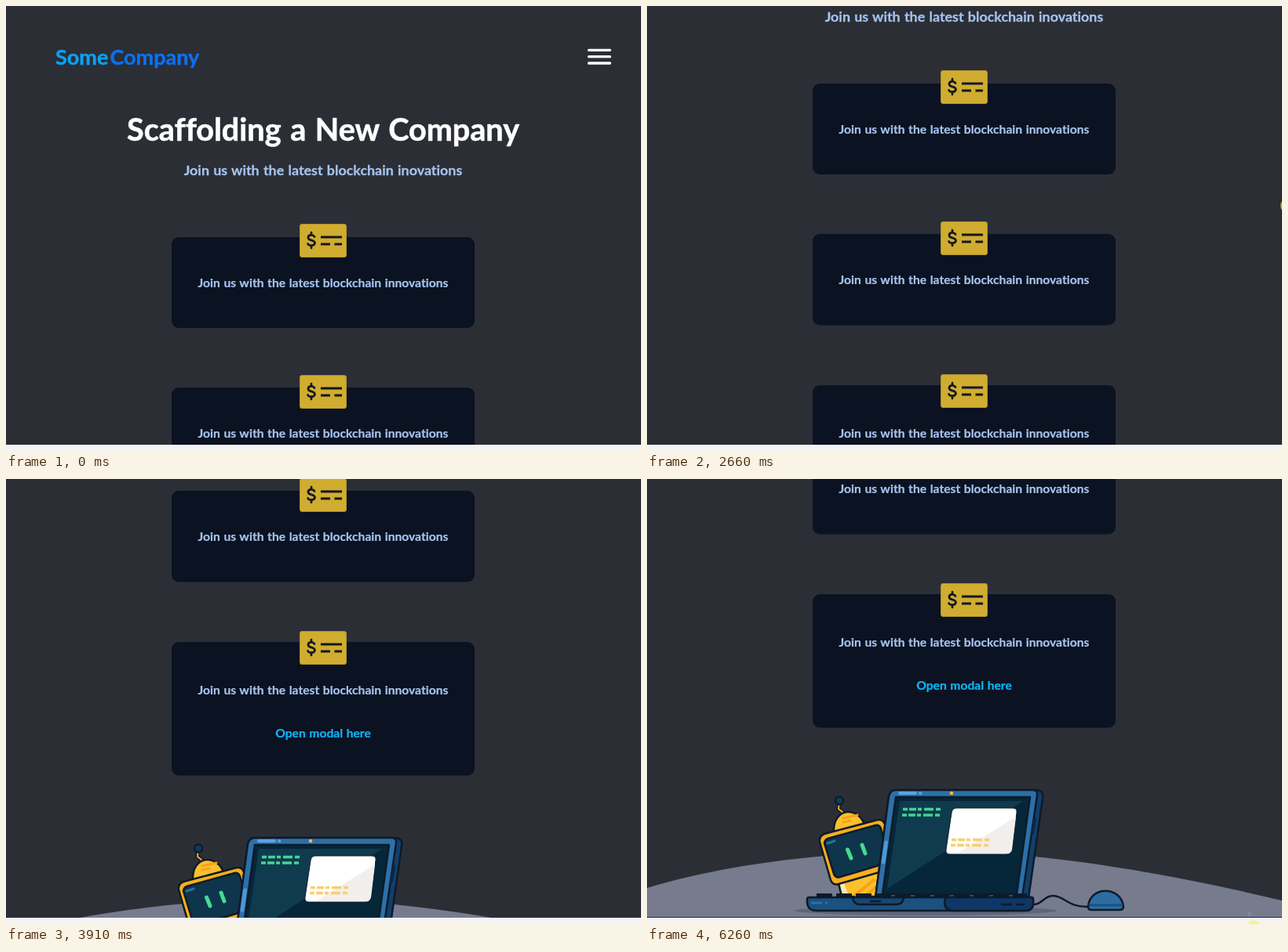
An HTML page for the animation above (6.32 s loop, 809 by 568 pixels).

```html
<!DOCTYPE html>
<html lang="en">
<head>
<meta charset="utf-8">
<title>Scrolling landing page</title>
<style>
  html, body { margin: 0; width: 100%; height: 100%; overflow: hidden; background: #2c2e36; }
  svg { display: block; width: 809px; height: 568px; }
  text {
    font: 700 15.65px Nunito, Lato, sans-serif; font-variant-ligatures: none; word-spacing: .05em;
    fill: currentColor; stroke: currentColor; stroke-width: .015em; stroke-linejoin: round;
  }
  .mid { text-anchor: middle; color: #a6c4ee; }
  .logo { font-size: 27px; }
  .ink { stroke: #0d1b28; stroke-width: 2.5; stroke-linejoin: round; }
  .line { fill: none; stroke-linecap: round; }
</style>
</head>
<body>
<svg viewBox="0 0 809 568">
  <defs>
    <g id="icon">
      <rect x="374.500" y=".5" width="59" height="42" rx="2.500" fill="#d0ad30" stroke="#b2942f"/>
      <path d="M393 16.500C391 13 384.500 14 385 18C385.500 22 393.500 20 393.500 24.500C393 28.500 386 28.500 384.500 25.500M389 11V14M389 28V31" class="line" stroke="#15171f" stroke-width="2.700"/>
      <path d="M401 17H428M401 26H413M418.500 26H428" fill="none" stroke="#15171f" stroke-width="3"/>
    </g>
  </defs>

  <rect width="809" height="568" fill="#2c2e36"/>
  <g id="page">
    <text class="logo" x="63" y="75" color="#09a3f2">Some</text>
    <text class="logo" x="132.500" y="75" color="#0b72f0">Company</text>
    <path d="M742.500 56.300H769.500M742.500 64.700H769.500M742.500 73H769.500" class="line" stroke="#fff" stroke-width="3.300"/>
    <text class="mid" x="404" y="172" style="font-size:39.6px;color:#fff">Scaffolding a New Company</text>
    <text class="mid" x="404" y="216" style="font-size:17.9px">Join us with the latest blockchain inovations</text>
    <g id="cards"></g>
    <text class="mid" x="404" y="802" style="color:#0db4f8">Open modal here</text>

    <g transform="translate(0 533)">
      <path d="M0 522C130 482 310 470 430 477C560 484 700 512 809 538V559H0Z" fill="#777b8e"/>
      <ellipse cx="355" cy="551" rx="167" ry="6" fill="#5f657d"/>

      <!-- robot -->
      <path d="M254 429L244 421L245 412" class="line" stroke="#0d1b28" stroke-width="5"/>
      <path d="M254 429L244 421L245 412" class="line" stroke="#f8b11f" stroke-width="2"/>
      <circle cx="245" cy="410.500" r="5" fill="#123c58" class="ink"/>
      <path d="M238 452C236 418 271 417 278 444Z" fill="#fcc02d" class="ink"/>
      <path d="M250 433L268 429M250 438L259 436" class="line" stroke="#f5a21a" stroke-width="3"/>
      <path d="M243 512L248 533H300V500Z" fill="#fcc02d" class="ink"/>
      <path d="M246 517L250 532H257L251 516Z" fill="#f7e9c2"/>
      <path d="M264 532L290 511M278 532L293 520" stroke="#f5a21a" stroke-width="4"/>
      <path d="M226 453L294 435Q301 434 303 441L318 489Q319 495 313 497L244 517Q237 519 234 512L220 463Q219 456 226 453Z" fill="#f8ae1d" class="ink"/>
      <path d="M230 459L291 442Q296 441 298 446L310 485L306 490L246 508Q240 510 238 504L226 465Q226 461 230 459Z" fill="#0e354b" class="ink"/>
      <path d="M230 465L239 462" class="line" stroke="#2b6f9b" stroke-width="3"/>
      <path d="M255.500 473L260 484M274 467L278 478" class="line" stroke="#43dc91" stroke-width="5"/>

      <!-- lid -->
      <path d="M317 397H497Q506 398 504 408L486 535H291L308 405Q310 397 317 397Z" fill="#123f6c" class="ink"/>
      <path d="M317 397H491Q498 397 497 404L478 534H291L308 405Q310 397 317 397Z" fill="#2d70a8" class="ink"/>
      <path d="M317 406H488L471 530H300Z" fill="#06263a" class="ink"/>
      <path d="M322 411H479L306 523Z" fill="#103b4e"/>
      <path d="M322 401H342M348 401H348.500" class="line" stroke="#5da2df" stroke-width="4"/>
      <path d="M304.500 464L301 489" class="line" stroke="#4b98d8" stroke-width="5"/>
      <path d="M494 434L491 452" class="line" stroke="#0a2745" stroke-width="4"/>
      <circle cx="388" cy="401" r="2.300" fill="#f6b652"/>
      <path d="M326 421.500H375M325 429H373" stroke="#43d592" stroke-width="3.500" stroke-dasharray="6 2 9 2 5 3 12 3"/>
      <path d="M394 420H466Q472 420 471 426L465 473Q464 479 458 479H386Q380 479 381 473L388 426Q389 420 394 420Z" fill="#fff" stroke="#0d1b28"/>
      <path d="M470 431L465 473Q464 478 458 478H395Z" fill="#f1efec"/>
      <path d="M388 460.500H437M387 467.500H435" stroke="#f8cf72" stroke-width="3.500" stroke-dasharray="6 2 9 2 5 3 12 3"/>

      <!-- base, cable and mouse -->
      <path d="M216 532H484" stroke="#0d1b28" stroke-width="6" stroke-dasharray="20 5"/>
      <path d="M492 543C503 544 506 531 518 532C533 533 536 547 563 546" class="line" stroke="#0d1b28" stroke-width="2.500"/>
      <path d="M206 534H490Q492 534 492 537V543Q491 551 482 551H216Q205 551 204 541V537Q204 534 206 534Z" fill="#1b507f" class="ink"/>
      <path d="M381 534H490Q492 534 492 537V543Q491 551 482 551H390Q379 551 379 540Z" fill="#0e3767" class="ink"/>
      <path d="M262 534H327Q326 543 318 543H271Q263 543 262 534Z" fill="#174673" class="ink"/>
      <path d="M285 539H297M452 543H464M471 543H480" class="line" stroke="#0d1b28" stroke-width="2.500"/>
      <path d="M210 541H222M228 541H229" class="line" stroke="#2d70a8" stroke-width="3"/>
      <path d="M562 546C564 519 604 519 607 546Q607 550 602 550H566Q562 550 562 546Z" fill="#2d6da4" class="ink"/>
      <path d="M563 544H606" stroke="#1b507f" stroke-width="3"/>
    </g>
  </g>

  <rect y="560" width="809" height="8" fill="#f3f3f3"/>
  <path id="trace" d="M765 553H770V558H765Z" fill="#8b8e9d"/>
  <g id="pointer">
    <circle r="9.500" fill="#f5f83c" fill-opacity=".65"/>
    <path d="M0 0V13L3 10L8 10Z" fill="#fff" stroke="#222" stroke-width=".7"/>
  </g>
</svg>
<script>
const LOOP = 6320, STEP = 69.7;
const $ = id => document.getElementById(id);

const card = (top, height, icon, baseline) => `
  <rect x="211" y="${top}" width="386" height="${height}" rx="9" fill="#0b1221"/>
  <use href="#icon" y="${icon}"/>
  <text class="mid" x="404" y="${baseline}">Join us with the latest blockchain innovations</text>`;
$('cards').innerHTML =
  card(295, 116, 278, 359) + card(487, 116.5, 471, 551) + card(680, 170.5, 666, 747);

// [step, scroll offset] of the scrollbar drag
const drag = [[-1, 0], [0, 1], [1, 4], [2, 10], [10, 124], [20, 267], [28, 395], [37, 533]];

function scrollAt(time) {
  const step = Math.floor((time - 1610) / STEP + .07);
  if (step < 0) return 0;
  const i = drag.findIndex(([s]) => s > step);
  if (i < 0) return 533;
  const [s0, y0] = drag[i - 1], [s1, y1] = drag[i];
  return Math.round(y0 + (y1 - y0) * (step - s0) / (s1 - s0));
}

function pointerAt(time, scroll) {
  if (time >= 130 && time < 200) return [798, 499.5];
  if (time >= 940 && time < 1410) return [818, 158.5];
  if (time >= 1410 && time < 3000) return [816.5, 158 + Math.min(scroll, 4) + .474 * scroll];
  if (time >= 5650 && time < 6000) {
    const k = Math.floor((time - 5650) / 70);
    return [812 - 10 * k, 520 + 9 * k];
  }
  if (time >= 6260) return [773, 573];
  return [-50, -50];
}

function draw() {
  const time = performance.now() % LOOP;
  const scroll = scrollAt(time);
  $('page').setAttribute('transform', `translate(0 ${-scroll})`);
  $('pointer').setAttribute('transform', `translate(${pointerAt(time, scroll)})`);
  $('trace').setAttribute('opacity', time >= 6000 ? .5 : 0);
  requestAnimationFrame(draw);
}
draw();
</script>
</body>
</html>
```
